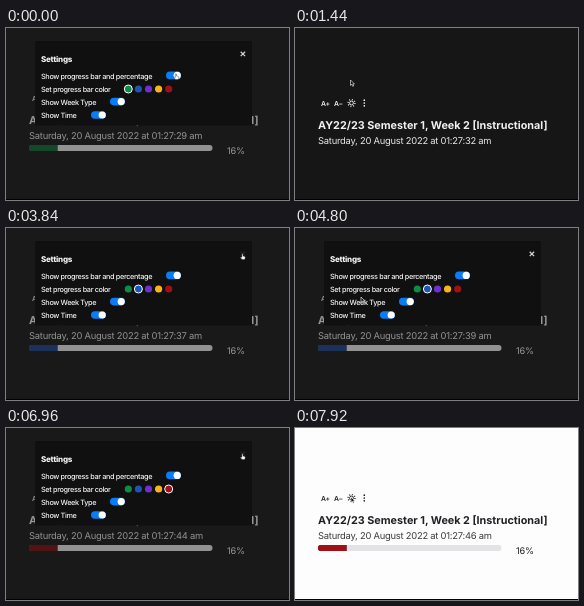
Recreate the animation shown at these times as an HTML page. Size 283 by 172 pixels, loop 8 s.

```html
<!DOCTYPE html>
<html lang="en">
<head>
<meta charset="utf-8">
<title>Semester week display</title>
<style>
  html, body { margin: 0; width: 100%; height: 100%; overflow: hidden; background: #161616; }
  svg { display: block; width: 100vw; height: 100vh; }
  text { font-family: Inter, "Liberation Sans", sans-serif; text-rendering: geometricPrecision; white-space: pre; }
  .title { font-size: 10.8px; font-weight: 700; }
  .date { font-size: 9.4px; letter-spacing: -.24px; }
  .percent { font-size: 9.2px; letter-spacing: -.2px; }
  .icon { font-size: 6.8px; font-weight: 600; letter-spacing: -.1px; }
  .heading { font-size: 8px; font-weight: 800; letter-spacing: -.25px; }
  .label { font-size: 7.3px; font-weight: 500; letter-spacing: -.36px; }
</style>
</head>
<body>
<svg viewBox="0 0 283 172" preserveAspectRatio="none">
  <rect id="bg" width="283" height="172"/>
  <g id="page">
    <g id="head">
      <text class="icon" x="26" y="72.5">A+</text>
      <text class="icon" x="39" y="72.5">A−</text>
      <g id="sun" transform="translate(56.5 70)" fill="none">
        <circle r="1.9" stroke-width=".9"/>
        <circle r="3.4" stroke-width="1.5" stroke-dasharray=".9 1.77"/>
      </g>
      <g id="menu"></g>
      <text id="title" class="title" x="23" y="96"></text>
      <text id="date" class="date" x="23" y="110.5"></text>
    </g>
    <g id="bar">
      <clipPath id="round"><rect x="23" y="117" width="183.5" height="6" rx="3"/></clipPath>
      <g clip-path="url(#round)">
        <rect id="track" x="23" y="117" width="184" height="6"/>
        <rect x="23" y="117" width="28.5" height="6" fill="#111"/>
        <rect id="fill" x="23" y="117" width="28.5" height="6"/>
      </g>
      <text class="percent" x="221" y="125.5">16%</text>
    </g>
  </g>
  <g id="modal" fill="#f5f5f5">
    <rect x="29" y="13" width="217" height="84.5" fill="#101010"/>
    <text class="heading" x="35" y="34.3">Settings</text>
    <text class="label" x="35" y="50.6">Show progress bar and percentage</text>
    <text class="label" x="35" y="64">Set progress bar color</text>
    <text class="label" x="35" y="77">Show Week Type</text>
    <text class="label" x="35" y="90.3">Show Time</text>
    <path id="cross" d="M234.7 23.7l4.4 4.4m0-4.4l-4.4 4.4" stroke="#d0d0d0" stroke-width="1.3"/>
    <g id="dots"></g>
    <g id="switches"></g>
  </g>
  <g id="cursor">
    <path id="arrow" d="M0 0v5.4l1.3-1.1.9 2 1-.4-.9-2h1.6z" fill="#111" stroke="#fff" stroke-width=".6"/>
    <path id="hand" transform="scale(.85)" d="M-.7 0q.7-.8 1.3 0v2.3l2 .5q.8.3.7 1.2l-.6 2.6h-3.4l-1.8-2.6q0-.9 1.1-.4l.7.5z" fill="#fff" stroke="#222" stroke-width=".5"/>
  </g>
  <rect y="171" width="283" height="1" fill="#000"/>
</svg>
<script>
const LOOP = 8000, HOLD = 180, PRESS = 120, FADE = 120;
const NS = "http://www.w3.org/2000/svg";
const $ = id => document.getElementById(id);
const clamp = v => Math.max(0, Math.min(1, v));
const set = (el, attrs) => { for (const k in attrs) el.setAttribute(k, attrs[k]); };
const add = (parent, tag, attrs) => {
  const el = document.createElementNS(NS, tag);
  set(el, attrs);
  return parent.appendChild(el);
};
const grey = (a, b, k) => {
  const v = Math.round(a + (b - a) * k);
  return `rgb(${v},${v},${v})`;
};

const colors = { green: "#108a45", blue: "#1c55b4", purple: "#7030cf", yellow: "#f7b51b", red: "#a01014" };
const names = Object.keys(colors);
const dotX = name => 122.3 + names.indexOf(name) * 10.1;

const controls = {
  bar: [170, 46], week: [110, 73], time: [92, 86],
  close: [236.5, 26], menu: [69, 73], sun: [56, 69]
};
for (const name of names) controls[name] = [dotX(name), 60];
const rests = { above: [55.5, 52], nearRed: [160, 58], label: [66, 69], corner: [262, 22] };

// Where the pointer arrives and when; each control is pressed once per visit
const visits = [
  [0, "bar"], [840, "close"], [1420, "above"], [1600, "menu"], [2240, "blue"],
  [2780, "nearRed"], [3000, "bar"], [3760, "close"], [4180, "menu"], [4760, "label"],
  [4900, "week"], [5200, "week"], [5560, "time"], [5880, "time"], [6320, "red"],
  [6720, "corner"], [6940, "close"], [7500, "sun"], [LOOP, "sun"]
];
const pressed = (...group) => visits
  .filter(([, name]) => group.includes(name))
  .map(([at, name]) => ({ at: at + PRESS, name }));

// Starts at 1 and flips with every press
const level = (presses, t, fade) => presses.reduce(
  (v, p, i) => v + (i % 2 ? 1 : -1) * clamp((t - p.at) / fade), 1);
const isOn = (presses, t) => presses.filter(p => t >= p.at).length % 2 === 0;

const presses = {
  bar: pressed("bar"), week: pressed("week"), time: pressed("time"),
  modal: pressed("close", "menu"), sun: pressed("sun"), color: pressed(...names)
};

for (const dy of [-2.8, 0, 2.8]) add($("menu"), "circle", { cx: 69.3, cy: 70 + dy, r: .85 });

const dots = names.map(name =>
  add($("dots"), "circle", { cx: dotX(name), cy: 61, fill: colors[name], "stroke-width": 1 }));

const makeSwitch = (name, x, y) => ({
  name, x,
  pill: add($("switches"), "rect", { x, y: y - 3.8, width: 15, height: 7.6, rx: 3.8 }),
  knob: add($("switches"), "circle", { cy: y, r: 3.6, fill: "#fff" })
});
const switches = [
  makeSwitch("bar", 160, 47.4), makeSwitch("week", 104, 73.6), makeSwitch("time", 85, 87)
];

function moveCursor(t) {
  const next = visits.findIndex(([at]) => at > t);
  const [t0, from] = visits[next - 1], [t1, to] = visits[next];
  const leave = t0 + Math.min(HOLD, (t1 - t0) / 2);
  const p = clamp((t - leave) / (t1 - leave));
  const k = p * p * (3 - 2 * p);
  const place = name => controls[name] || rests[name];
  const [x, y] = place(from).map((v, i) => v + (place(to)[i] - v) * k);
  const over = k < .05 ? from : k > .95 ? to : "";
  const hand = over in controls;
  set($("cursor"), { transform: `translate(${x} ${y})` });
  set($("arrow"), { visibility: hand ? "hidden" : "visible" });
  set($("hand"), { visibility: hand ? "visible" : "hidden" });
  set($("cross"), { opacity: over === "close" ? .1 : 1 });
}

function draw(t) {
  const open = level(presses.modal, t, FADE);
  const light = !isOn(presses.sun, t);
  const ink = light ? "#202124" : "#f0f0f0";
  const picked = presses.color.filter(p => t >= p.at).pop()?.name || "green";
  const bar = isOn(presses.bar, t);

  set($("bg"), { fill: light ? "#fdfdfd" : grey(22, 25, open) });
  set($("page"), { fill: ink, opacity: 1 - .42 * open });
  set($("sun"), { stroke: ink });
  set($("head"), { transform: `translate(0 ${bar ? 0 : 5})` });
  set($("date"), { fill: light ? "#3c3c3e" : "#e8e8e8" });
  set($("bar"), { visibility: bar ? "visible" : "hidden" });
  set($("track"), { fill: light ? "#e3e3e5" : "#e9e9e9" });
  set($("fill"), { fill: colors[picked], "fill-opacity": 1 - .25 * open });

  const second = 29 + Math.floor(.5 + 2.1 * t / 1000);
  $("title").textContent = "AY22/23 Semester 1, Week 2" + (isOn(presses.week, t) ? " [Instructional]" : "");
  $("date").textContent = "Saturday, 20 August 2022" + (isOn(presses.time, t) ? ` at 01:27:${second} am` : "");

  set($("modal"), { opacity: open });
  dots.forEach((dot, i) => {
    const chosen = names[i] === picked;
    set(dot, { r: chosen ? 4 : 3.6, stroke: chosen ? "#fff" : "none" });
  });
  for (const s of switches) {
    const on = level(presses[s.name], t, FADE);
    set(s.pill, { fill: on > .5 ? "#0a7cf5" : "#a8a8aa" });
    set(s.knob, { cx: s.x + 3.8 + 7.4 * on });
  }
  moveCursor(t);
}

function tick() {
  draw(performance.now() % LOOP);
  requestAnimationFrame(tick);
}
tick();
</script>
</body>
</html>
```
